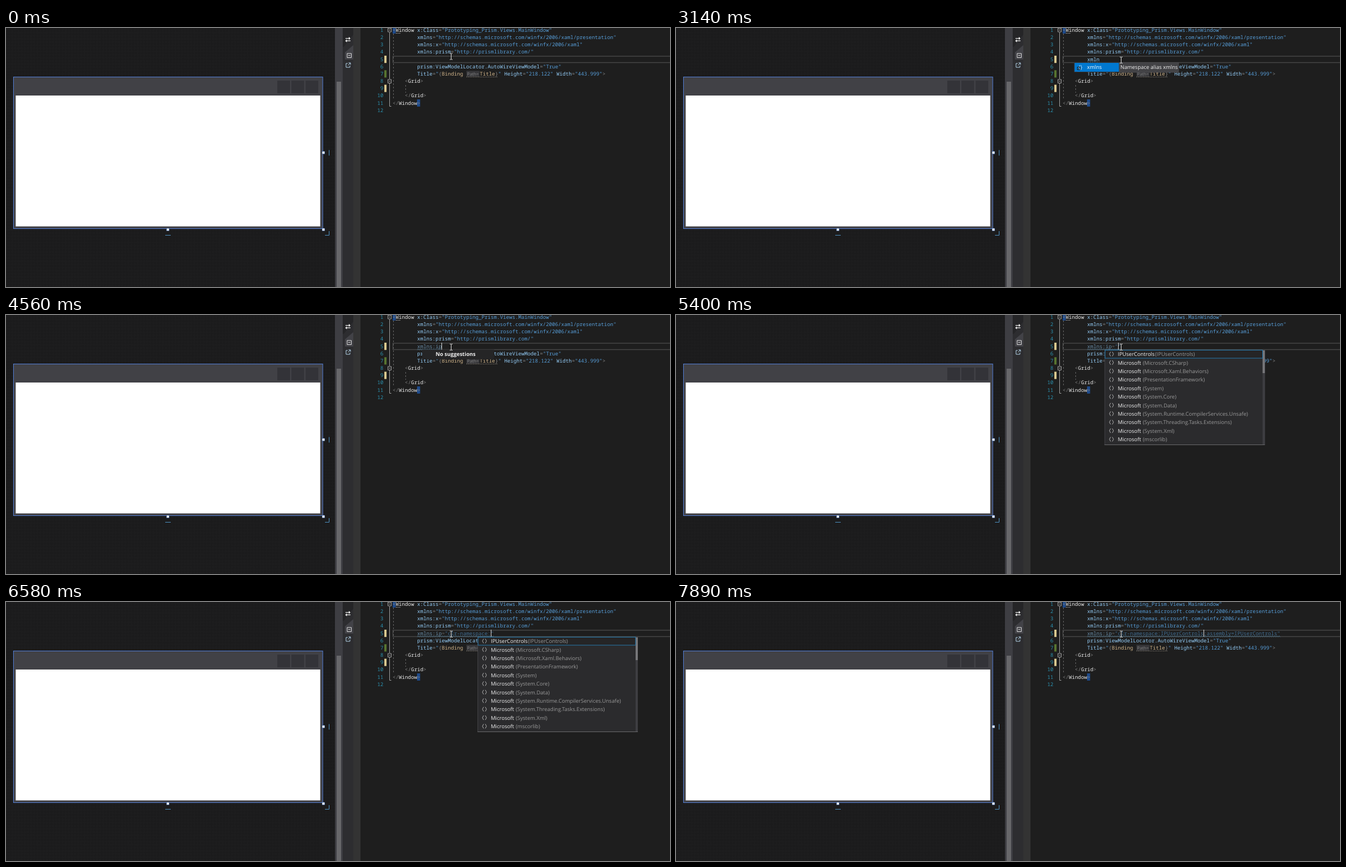
An HTML page that plays this animation: 1197x468 px, repeating every 8 s.

```html
<!DOCTYPE html>
<html lang="en">
<head>
<meta charset="utf-8">
<title>XAML editor</title>
<style>
html, body { margin: 0; width: 100%; height: 100%; overflow: hidden; background: #1e1e1e; }
svg { display: block; width: 1197px; height: 468px; }
text { white-space: pre; text-rendering: geometricPrecision; }
.code { font: 9.217px "Noto Sans Mono", monospace; }
.ui { font: 9.5px "Open Sans", sans-serif; }
</style>
</head>
<body>
<svg id="stage" viewBox="0 0 1197 468">
  <defs>
    <pattern id="checks" width="8" height="8" patternUnits="userSpaceOnUse" patternTransform="rotate(45)">
      <rect width="8" height="8" fill="#1b1b1c"/>
      <path d="M0 0h4v4h-4zM4 4h4v4h-4z" fill="#1d1d1e"/>
    </pattern>
  </defs>
  <g id="back"></g>
  <g id="live"></g>
  <g id="mouse" fill="none" stroke="#e8e8e8">
    <path d="M-2.5 -5.5H-.7L0 -5L.7 -5.5H2.5M0 -5V5M-2.5 5.5H-.7L0 5L.7 5.5H2.5"/>
  </g>
</svg>
<script>
const LOOP = 8000, CHAR = 5.53, LEFT = 697, PITCH = 13.15;
const COLOR = { attr: '#92caf4', value: '#569cd6', mark: '#808080', name: '#e8e8e8', ext: '#d0b48a' };
const INDENT = LEFT + 8 * CHAR;
const back = document.getElementById('back');
const live = document.getElementById('live');
const mouse = document.getElementById('mouse');

function add(parent, tag, attrs, content) {
  const el = document.createElementNS('http://www.w3.org/2000/svg', tag);
  for (const key in attrs) el.setAttribute(key, attrs[key]);
  if (content) el.textContent = content;
  parent.appendChild(el);
  return el;
}
const rect = (p, x, y, width, height, fill, more) => add(p, 'rect', { x, y, width, height, fill, ...more });
const path = (p, d, stroke, more) => add(p, 'path', { d, stroke, fill: 'none', ...more });
const label = (p, x, y, fill, s, more) => add(p, 'text', { x, y, fill, class: 'ui', ...more }, s);
const baseline = n => 7 + PITCH * (n - 1);

// Places coloured tokens one after another on the character grid.
function code(p, line, x, tokens, more) {
  for (const [kind, s] of tokens) {
    add(p, 'text', { x, y: baseline(line), fill: COLOR[kind], class: 'code', ...more }, s);
    x += s.length * CHAR;
  }
}
const pair = (name, value) => [['attr', name], ['mark', '='], ['value', `"${value}"`]];

function drawDesigner() {
  rect(back, 0, 0, 593, 468, 'url(#checks)');
  rect(back, 13.5, 88.5, 557.5, 274, '#414146', { stroke: '#527fd8' });
  for (const x of [489, 514.5, 540]) rect(back, x, 95, 23, 23, '#333338');
  rect(back, 17.5, 122, 549, 236.5, '#ffffff');
  for (const [x, y] of [[570, 223], [289.5, 362], [570, 362]])
    rect(back, x, y, 4.5, 4.5, '#ffffff', { stroke: '#3c6ab0', 'stroke-width': .6 });
  path(back, 'M582.5 220.5V230.5M287 374.5H297M575 374.5H582.5V367', '#4f93c4');
}

function drawSplitter() {
  rect(back, 593, 0, 14, 468, '#3e3e43');
  rect(back, 596, 97, 8, 371, '#68686b');
  rect(back, 607, 0, 19, 468, '#2d2d30');
  add(back, 'path', { d: 'M607 0H626V12L609 34H607Z', fill: '#252527' });
  add(back, 'path', { d: 'M626 31L611 44V57H626Z', fill: '#424247' });
  rect(back, 626, 0, 13, 468, '#333333');
  path(back, 'M612 18.8H619M621 23.2H613.5', '#f1f1f1', { 'stroke-width': 1.3 });
  add(back, 'path', { d: 'M618 16L621 18.8L618 21.5ZM614.5 20.5L611.5 23.2L614.5 26Z', fill: '#f1f1f1' });
  path(back, 'M615 46H622.5V53.5H615ZM617 49.7H620.5', '#e4e4e4');
  path(back, 'M616 64H613V71H620V68M617.5 63H621V66.5M621 63L616.5 67.5', '#b8d8ee');
}

function drawEditor() {
  rect(back, 639, 0, 558, 468, '#1e1e1e');
  for (let n = 1; n <= 12; n++)
    add(back, 'text', { x: 680.3, y: baseline(n), fill: '#2b91af', class: 'code', 'text-anchor': 'end' }, String(n));
  for (const [y, fill] of [[50, '#d8c78f'], [76.3, '#577430'], [102.5, '#d8c78f']])
    rect(back, 682, y, 4, 13.2, fill);

  path(back, 'M691.5 8V92M691.5 100V141.5H694.5', '#a5a5a5');
  for (const y of [.5, 93])
    path(back, `M688.5 ${y}h6v6.5h-6zM690 ${y + 3.2}h3`, '#a5a5a5');
  path(back, 'M698.5 10V129M720.5 103V117', '#686868', { 'stroke-dasharray': '3 3' });
  path(back, 'M1197 51H697.5V62.5H1197', '#464646', { 'stroke-width': 1.4 });
  rect(back, 697, -1, 5.5, 11, '#1d4a8c');
  rect(back, 741, 129, 5.5, 13, '#1d4a8c');
  path(back, 'M703 9.5H711', '#c8c8c8', { 'stroke-dasharray': '1.5 1.5' });

  code(back, 1, LEFT, [['mark', '<'], ['name', 'Window'], ['name', ' '],
    ...pair('x:Class', 'Prototyping_Prism.Views.MainWindow')]);
  code(back, 2, INDENT, pair('xmlns', 'http://schemas.microsoft.com/winfx/2006/xaml/presentation'));
  code(back, 3, INDENT, pair('xmlns:x', 'http://schemas.microsoft.com/winfx/2006/xaml'));
  code(back, 4, INDENT, pair('xmlns:prism', 'http://prismlibrary.com/'));
  code(back, 6, INDENT, pair('prism:ViewModelLocator.AutoWireViewModel', 'True'));
  code(back, 7, INDENT, [['attr', 'Title'], ['mark', '='], ['value', '"'], ['mark', '{'], ['ext', 'Binding']]);
  rect(back, 830, 77.5, 23.5, 10.5, '#37373a');
  label(back, 831.2, 86, '#858585', 'Path=', { style: 'font-size:7.8px' });
  path(back, 'M830 88.5H887', '#8b8378', { 'stroke-dasharray': '1.5 1.5' });
  code(back, 7, 854, [['ext', 'Title'], ['mark', '}'], ['value', '" '],
    ...pair('Height', '218.122'), ['mark', ' '], ...pair('Width', '443.999'), ['mark', '>']]);
  code(back, 8, LEFT + 4 * CHAR, [['mark', '<'], ['name', 'Grid'], ['mark', '>']]);
  code(back, 10, LEFT + 4 * CHAR, [['mark', '</'], ['name', 'Grid'], ['mark', '>']]);
  code(back, 11, LEFT, [['mark', '</'], ['name', 'Window'], ['mark', '>']]);
}

const chevrons = (x, y, stroke) =>
  path(live, `M${x - 1.5} ${y - 4}L${x - 3.7} ${y}L${x - 1.5} ${y + 4}M${x + 1.5} ${y - 4}L${x + 3.7} ${y}L${x + 1.5} ${y + 4}`, stroke);

const ASSEMBLIES = ['IPUserControls', 'Microsoft.CSharp', 'Microsoft.Xaml.Behaviors', 'PresentationFramework',
  'System', 'System.Core', 'System.Data', 'System.Runtime.CompilerServices.Unsafe',
  'System.Threading.Tasks.Extensions', 'System.Xml', 'mscorlib'];

const popups = {
  alias() {
    rect(live, 718, 62.5, 81, 17, '#0078d0', { stroke: '#333337' });
    label(live, 725.5, 73.5, '#d5e8f5', '{}', { 'font-weight': 600 });
    path(live, 'M723.5 70.5H728.5V75.5H723.5ZM725 74L727.5 71.8', '#1e1e1e');
    label(live, 741, 74.2, '#ffffff', 'xmlns');
  },
  tip() {
    popups.alias();
    rect(live, 799.5, 62.5, 106.5, 17.5, '#424245', { stroke: '#4d4d50' });
    label(live, 801, 74.4, '#f1f1f1', 'Namespace alias xmlns');
  },
  none() {
    rect(live, 750, 62.5, 130, 17.5, '#252526');
    label(live, 774.5, 74.2, '#f1f1f1', 'No suggestions', { style: 'font-weight:700' });
  },
  clr() {
    rect(live, 773, 62.5, 122.5, 16, '#0078d0', { stroke: '#333337' });
    chevrons(785, 70.5, '#1e1e1e');
    label(live, 796.5, 74, '#ffffff', 'clr-namespace:');
  },
  list(x) {
    rect(live, x + .5, 63.5, 288, 171, '#2b2b2d', { stroke: '#434346' });
    path(live, `M${x} 234.5H${x + 289}`, '#69696c');
    rect(live, x + 285, 63, 4, 171, '#3e3e42');
    rect(live, x + 285, 64, 4, 41, '#77777a');
    rect(live, x + 1, 63.5, 284, 14.5, '#252526', { stroke: '#2479ad' });
    ASSEMBLIES.forEach((name, i) => {
      const y = 70.5 + i * 15.4;
      chevrons(x + 12.5, y, '#b5b5b5');
      label(live, x + 24, y + 3.6, '#f1f1f1', i ? 'Microsoft' : name);
      label(live, x + (i ? 69 : 91), y + 3.6, '#999999', `(${name})`);
    });
  },
  listNear() { popups.list(772.5); },
  listFar() { popups.list(850); }
};

const NS = 'xmlns:ip="', CLR = NS + 'clr-namespace:';
// Start time, text before the caret, text after it, caret shown, popup.
const STEPS = [
  [0, '', '', 0],
  [470, '', '', 1],
  [1020, '', '', 0],
  [1570, '', '', 1],
  [1970, 'x', '', 1],
  [2200, 'xm', '', 1],
  [2270, 'xm', '', 1, 'alias'],
  [2420, 'xml', '', 1, 'alias'],
  [2590, 'xmln', '', 1, 'alias'],
  [3140, 'xmln', '', 0, 'tip'],
  [3290, 'xmlns', '', 1],
  [3450, 'xmlns:', '', 1],
  [3770, 'xmlns:i', '', 1],
  [3930, 'xmlns:i', '', 1, 'none'],
  [4480, 'xmlns:ip', '', 1, 'none'],
  [5020, 'xmlns:ip', '', 0, 'none'],
  [5250, NS, '"', 1],
  [5330, NS, '"', 1, 'listNear'],
  [5710, NS + 'c', '"', 1, 'clr'],
  [5950, NS + 'cl', '"', 1, 'clr'],
  [6490, CLR, '"', 1],
  [6580, CLR, '"', 1, 'listFar'],
  [6980, CLR, '"', 0, 'listFar'],
  [7510, CLR, '"', 1, 'listFar'],
  [7810, CLR + 'IPUserControls', ';assembly=IPUserControls"', 1]
];

function squiggle(length) {
  let d = `M${INDENT} 63`;
  for (let x = 2, up = true; x <= length; x += 2, up = !up) d += `L${INDENT + x} ${up ? 61.2 : 63}`;
  path(live, d, '#5688a8', { 'stroke-width': .8 });
}

function drawStep([, before, after, caret, popup]) {
  live.replaceChildren();
  const text = before + after, eq = text.indexOf('=');
  const end = INDENT + before.length * CHAR;
  if (popup === 'clr') {
    for (const x of [INDENT + 9 * CHAR, end]) rect(live, x, 51, CHAR, 11.5, '#1d4a8c');
  }
  const tokens = eq < 0 ? [['attr', text]]
    : [['attr', text.slice(0, eq)], ['mark', '='], ['value', text.slice(eq + 1)]];
  if (text) {
    code(live, 5, INDENT, tokens, { opacity: text.includes(':') ? .62 : 1 });
    squiggle(text.length * CHAR);
  }
  if (popup) popups[popup]();
  if (caret) rect(live, Math.round(end), 50, 1, 12.5, '#dcdcdc');
}

let shown = null;
function render(t) {
  const step = STEPS.findLast(s => s[0] <= t);
  if (step !== shown) drawStep(shown = step);
  mouse.setAttribute('transform', `translate(802.5 ${t < 70 ? 51.5 : t < 170 ? 55 : 58})`);
}

drawDesigner();
drawSplitter();
drawEditor();
const start = performance.now();
function tick() {
  render((performance.now() - start) % LOOP);
  requestAnimationFrame(tick);
}
tick();
</script>
</body>
</html>
```
